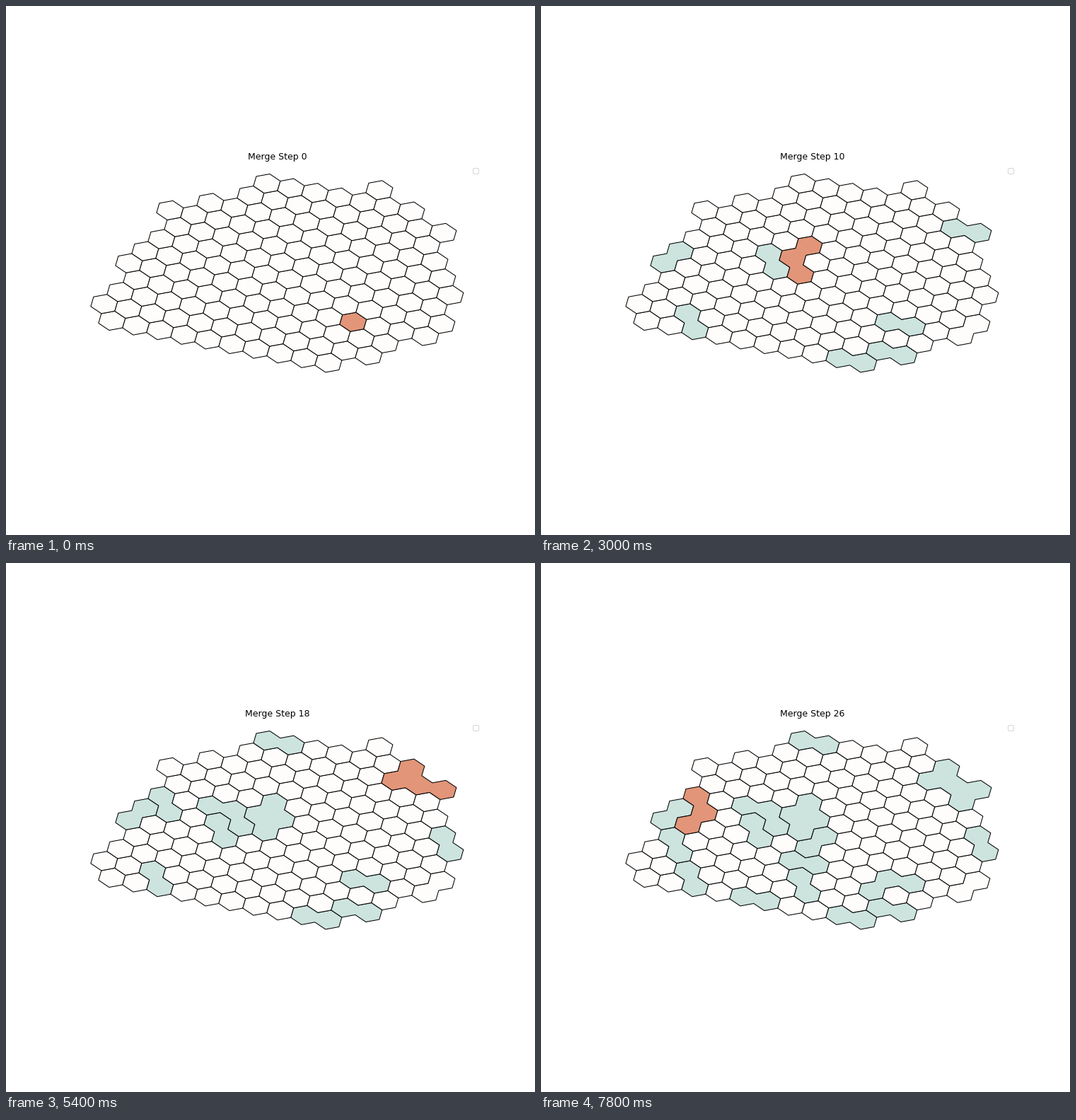
A matplotlib script that plays this animation: 748x748 px, repeating every 8000 ms.

```python
import math

import numpy as np
import matplotlib.pyplot as plt
from matplotlib.animation import FuncAnimation
from matplotlib.collections import PolyCollection

PLAIN, MERGED, CURRENT = "#fefdfc", "#cce3de", "#e29578"

# Sheared hexagon lattice: the centre of cell (i, j) is i*U + j*V
U, V = np.array([34.02, -6.61]), np.array([23.02, 17.04])
# Cell corners in thirds of U and V
CORNERS = [(1, 1), (-1, 2), (-2, 1), (-1, -1), (1, -2), (2, -1)]

# Where a cell merge happens: a point on a border joins two cells, a point
# on a corner joins three, and a centre only highlights its own cell
SITES = [(8, 3), (8, 3), (8.5, 3), (8.5, 0), (2, 6.5), (1.5, 0.5), (9.5, 1),
         (6.5, 10), (-2, 4.5), (1.5, 5.5), (2.5, 5.5), (9.5, 6.5), (-0.5, 11),
         (8, 4), (0.5, 6), (1.5, 4.5), (2.5, 6), (-1.5, 5.5), (16/3, 31/3),
         (4.5, 0), (4, 4.5), (5.5, 1.5), (-0.5, 2.5), (4.5, 3), (8, 2.5),
         (7, 9.5), (-1, 4.5)]
QUIET_SITE = (11, 3.5)  # joined after the start without a tint


def make_cells():
    """All cells between two borders that bend at a few rows."""
    cells = []
    for j in range(13):
        left = np.interp(j, [0, 1, 4, 8, 11, 12], [0, -1, -2, -3, -1, 3])
        right = np.interp(j, [0, 1, 3, 4, 6, 8, 10, 12],
                          [9, 10, 11, 11, 10, 8, 7, 3])
        first = math.ceil(left - 1e-9)
        last = math.floor(right + 1e-9)
        cells += [(i, j) for i in range(first, last + 1)]
    return cells


CELLS = make_cells()


def cells_at(site):
    """Cells that contain the point or touch it."""
    def distance(cell):
        di, dj = cell[0] - site[0], cell[1] - site[1]
        return di * di + di * dj + dj * dj
    return [c for c in CELLS if distance(c) < 0.4]


def outline(group):
    """Boundary of a group of cells, walked corner to corner."""
    edges = set()
    for i, j in group:
        ring = [(3 * i + p, 3 * j + q) for p, q in CORNERS]
        edges.update(zip(ring, ring[1:] + ring[:1]))
    following = {a: b for a, b in edges if (b, a) not in edges}
    start = min(following)
    path, corner = [start], following[start]
    while corner != start:
        path.append(corner)
        corner = following[corner]
    return np.array(path) @ np.array([U, V]) / 3


def state(step):
    """Outlines and fill colours after the given step."""
    group_of = {cell: frozenset([cell]) for cell in CELLS}

    def join(site):
        joined = frozenset().union(*(group_of[c] for c in cells_at(site)))
        group_of.update((c, joined) for c in joined)
        return joined

    if step > 0:
        join(QUIET_SITE)
    tinted = set()
    for site in SITES[:step + 1]:
        current = join(site)
        if len(current) > 1:
            tinted |= current

    groups = list(dict.fromkeys(group_of.values()))
    colors = [CURRENT if g == current else MERGED if g & tinted else PLAIN
              for g in groups]
    return [outline(g) for g in groups], colors


STATES = [state(step) for step in range(len(SITES))]

fig, ax = plt.subplots(figsize=(10, 10), dpi=74.8)
tiles = PolyCollection(STATES[0][0], edgecolors="black", linewidths=1)
ax.add_collection(tiles)
ax.autoscale_view()
ax.set_aspect("equal")
ax.axis("off")
ax.legend([], [], loc="upper right")
title = ax.set_title("", fontsize=12, family="DejaVu Sans")


def update(frame):
    step = frame // 3
    verts, colors = STATES[step]
    tiles.set_verts(verts)
    tiles.set_facecolor(colors)
    title.set_text(f"Merge Step {step}")
    return tiles, title


anim = FuncAnimation(fig, update, frames=80, interval=100,
                     repeat=True, repeat_delay=0)
plt.show()
```
